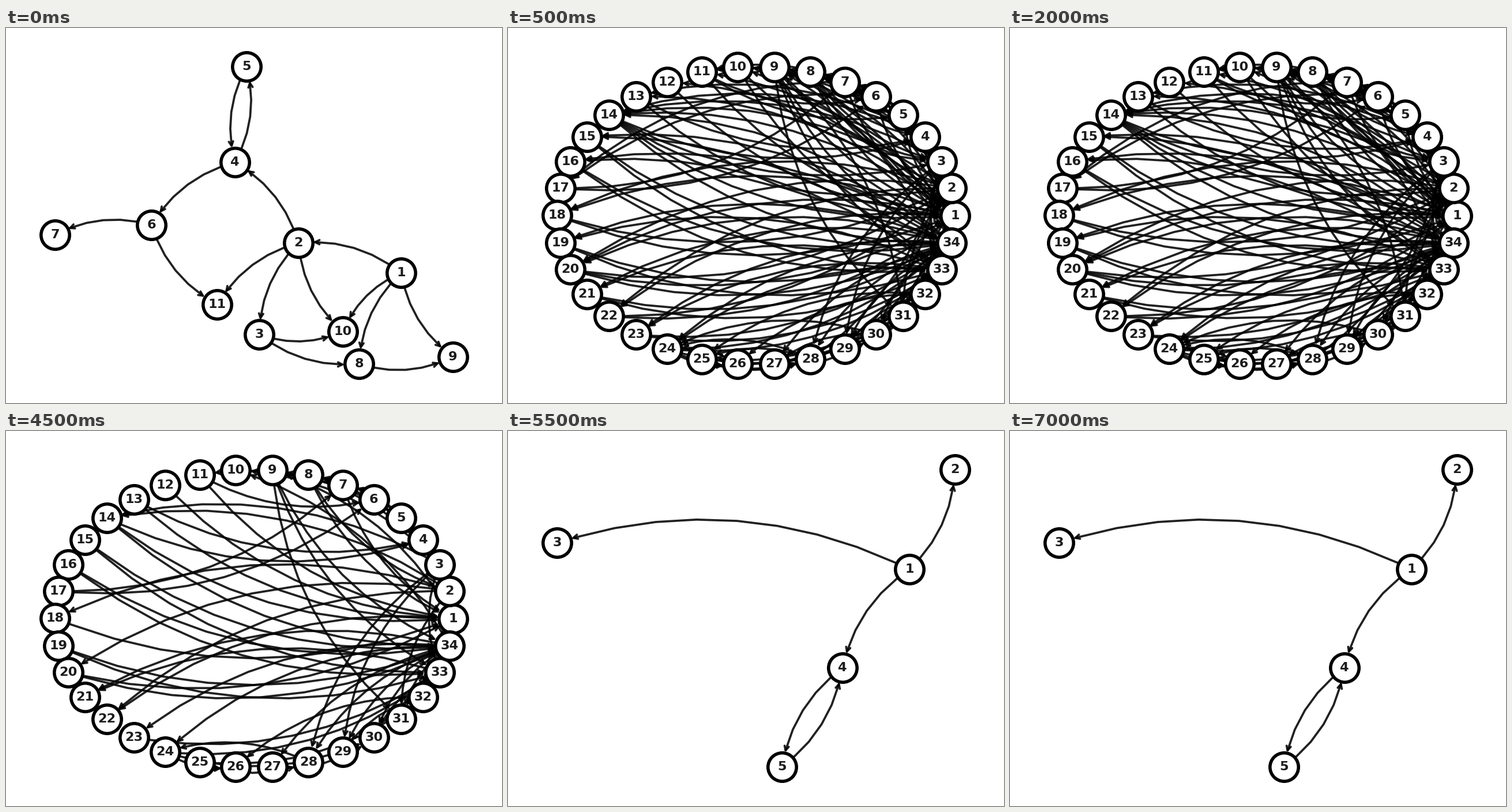
These frames come from a looping animation (860x651 px, 8000 ms). A matplotlib script:

```python
import numpy as np
import matplotlib.pyplot as plt
from matplotlib.animation import FuncAnimation
from matplotlib.collections import LineCollection

W, H, DPI = 860, 651, 100
PX = 72 / DPI                      # one pixel in points
UNIT = 100 / 72 * 1.344            # drawing unit in pixels
RADIUS, RING, EDGE = 24.7, 3 * UNIT, 2 * UNIT
HEAD_LEN, HEAD_HALF = 4 * UNIT, 2 * UNIT
BEND = 0.2

fig = plt.figure(figsize=(W / DPI, H / DPI), dpi=DPI, facecolor="white")
ax = fig.add_axes([0, 0, 1, 1])
ax.set_xlim(0, W)
ax.set_ylim(H, 0)
ax.axis("off")


def bezier(a, c, b, t):
    t = np.asarray(t)[:, None]
    return (1 - t) ** 2 * a + 2 * t * (1 - t) * c + t ** 2 * b


def arrow(a, b):
    """Bent shaft from node a to node b, and its open head."""
    d = b - a
    c = (a + b) / 2 + BEND * np.array([-d[1], d[0]])
    t = np.linspace(0, 1, 600)
    p = bezier(a, c, b, t)
    # the head is set back so its thick point just meets the ring
    back = EDGE / 2 * np.hypot(HEAD_LEN, HEAD_HALF) / HEAD_HALF
    start = t[np.argmax(np.hypot(*(p - a).T) >= RADIUS)]
    end = t[::-1][np.argmax(np.hypot(*(p - b).T)[::-1] >= RADIUS + back)]
    if end <= start:
        start = end = 0.5
    # longer shafts get more straight pieces
    sag = BEND * np.hypot(*d) * (end - start)
    steps = 2 ** max(2, int(np.ceil(np.log(max(sag, 1) / 2) / np.log(4))))
    shaft = bezier(a, c, b, np.linspace(start, end, steps + 1))
    u = (1 - end) * (c - a) + end * (b - c)
    u = u / np.hypot(*u)
    side = HEAD_HALF * np.array([-u[1], u[0]])
    base = shaft[-1] - HEAD_LEN * u
    return shaft, np.array([base + side, shaft[-1], base - side])


def draw_graph(pos, links):
    pos = {k: np.array(p, float) for k, p in pos.items()}
    lines = [part for a, b in sorted(links) for part in arrow(pos[a], pos[b])]
    edges = LineCollection(lines, colors="black", alpha=0.87, linewidths=EDGE * PX,
                           capstyle="round", joinstyle="round", zorder=1)
    ax.add_collection(edges, autolim=False)
    rings = ax.scatter(*zip(*pos.values()), s=(2 * RADIUS * PX) ** 2, c="white",
                       edgecolors="black", linewidths=RING * PX, zorder=2)
    labels = [ax.text(x, y, str(k), size=12 * UNIT * PX, weight="bold",
                      color="#1c1c1c", family="DejaVu Sans",
                      ha="center", va="center", zorder=3)
              for k, (x, y) in pos.items()]
    return [edges, rings, *labels]


def pairs(links):
    return {(a, b) for a, ends in links.items() for b in ends}


def toward_hubs(links):
    """Nodes on the left arc point at most hubs; other links run as listed."""
    arc, takers = range(11, 21), {1, 4, 6, 7, 33, 34}
    return {(b, a) if b in arc and a in takers else (a, b) for a, b in links}


def ring(n):
    angle = np.arange(n) * 2 * np.pi / n
    xy = zip(430 + 345 * np.cos(angle), 325.5 - 259 * np.sin(angle))
    return dict(enumerate(xy, 1))


small_pos = dict(enumerate([(685, 425), (507, 373), (439, 532), (397, 233),
                            (417, 67), (252, 342), (85, 359), (612, 583),
                            (775, 571), (584, 527), (366, 480)], 1))
small = pairs({1: [2, 8, 9, 10], 2: [3, 4, 10, 11], 3: [8, 10], 4: [5, 6],
               5: [4], 6: [7, 11], 8: [9]})

tiny_pos = dict(enumerate([(696, 240), (775, 67), (85, 194), (580, 411),
                           (475, 583)], 1))
tiny = pairs({1: [2, 3, 4], 4: [5], 5: [4]})

# a few hubs hold most of the links in the club
club = toward_hubs(pairs({
    1: [*range(2, 7), 9, *range(11, 15), 18, 20, 22, 32],
    2: [3, 4, 14, 18, 20, 22, 31],
    3: [4, 8, 9, 10, 14, 28, 29, 33],
    4: [8, 13, 14], 5: [7, 11], 6: [7, 11, 17], 7: [1, 17], 8: [1, 2],
    9: [31, 33, 34], 23: [33], 24: [26, 30, 33], 25: [26, 28, 32],
    27: [30], 28: [24], 32: [26, 29],
    33: [15, 16, 19, 21, *range(30, 33), 34],
    34: [10, *range(14, 17), *range(19, 22), 23, 24, *range(27, 33)]}))
mutual = club | {(b, a) for a, b in club}

scenes = [draw_graph(small_pos, small), draw_graph(ring(34), mutual),
          draw_graph(ring(34), club), draw_graph(tiny_pos, tiny)]


def update(i):
    current = (i + 4) // 5         # one short step, then five steps per scene
    for k, scene in enumerate(scenes):
        for artist in scene:
            artist.set_visible(k == current)
    return [artist for scene in scenes for artist in scene]


anim = FuncAnimation(fig, update, frames=16, interval=500, repeat=True,
                     repeat_delay=0, init_func=lambda: update(0), blit=False)
plt.show()
```
